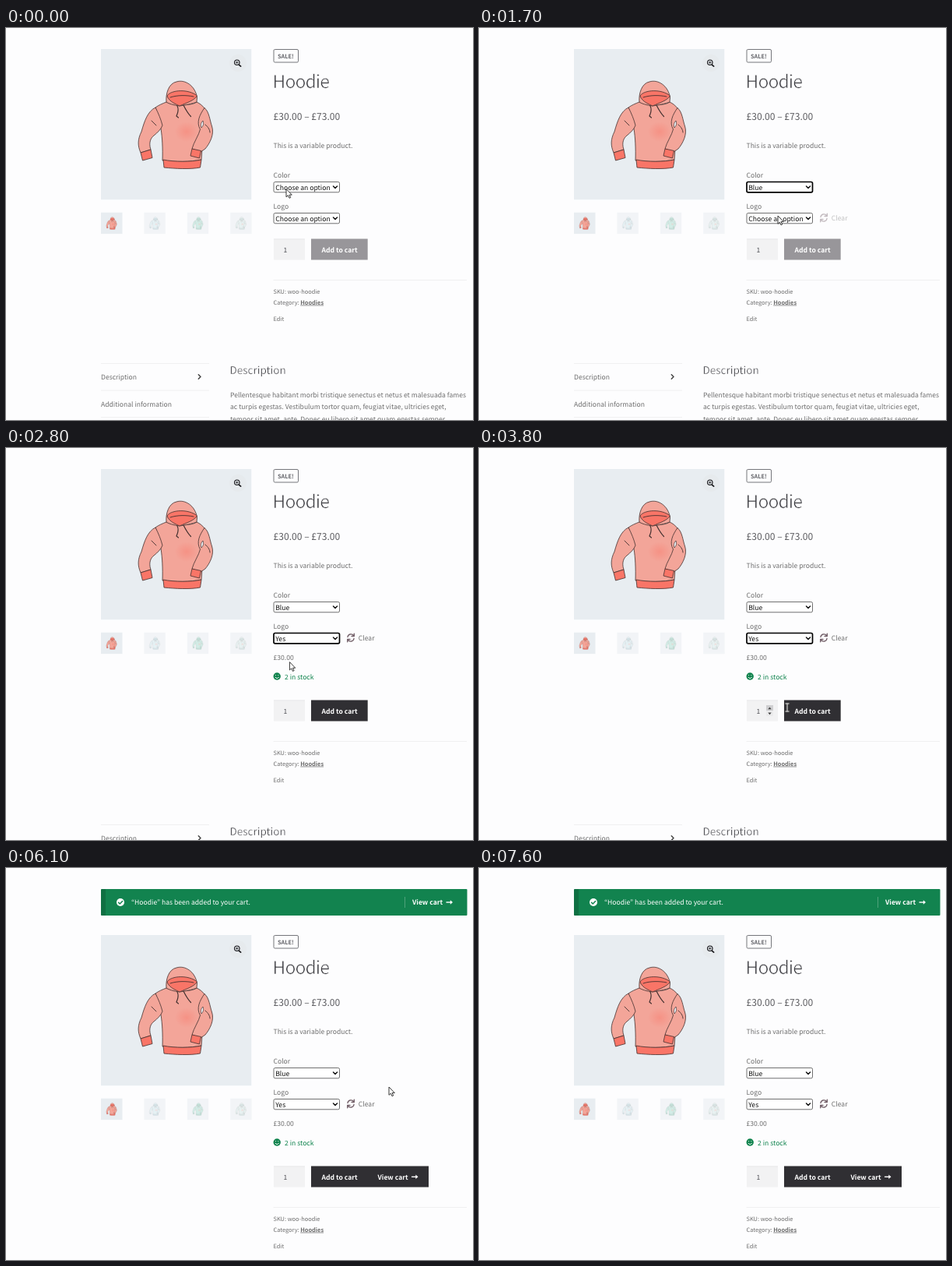
Write an HTML page that moves like this. It is 600 px wide and 503 px high and loops after 8.1 s.

```html
<!DOCTYPE html>
<html lang="en">
<head>
<meta charset="utf-8">
<title>Hoodie</title>
<style>
  html, body { margin: 0; width: 100%; height: 100%; overflow: hidden; background: #fdfdfe; }
  svg { display: block; }
  text {
    font: 8.58px "Noto Sans CJK KR", "Noto Sans CJK JP", "Noto Sans CJK SC", "Open Sans", sans-serif;
    fill: #6d6d6d; text-rendering: geometricPrecision;
  }
  .bold { font-weight: 600; }
  .small { font-size: 7.42px; }
  .white { fill: #fff; }
  .ink { fill: #111; }
  .light { font-weight: 300; fill: #3a3a3f; }
  .title { font-size: 23px; letter-spacing: -.04em; }
  .thinned .light { stroke: #fdfdfe; stroke-width: .028em; }
  .rule { stroke: #f0f0f1; }
  .line { fill: none; stroke-linecap: round; stroke-linejoin: round; }
  .cloth { fill: var(--cloth); stroke: #43302f; stroke-width: .8; stroke-linejoin: round; }
  .trim { fill: var(--trim); }
  .coral { --cloth: #f3a599; --trim: #f97567; }
  .blue { --cloth: #cfe6ec; --trim: #b4d6e0; }
  .green { --cloth: #a9dccf; --trim: #8cccbb; }
  .pale { --cloth: #d3e6e5; --trim: #bcd9d8; }
</style>
</head>
<body>
<svg id="stage" width="600" height="503" viewBox="0 0 600 503">
  <defs>
    <radialGradient id="blush">
      <stop offset="0" stop-color="#f97567" stop-opacity=".4"/>
      <stop offset="1" stop-color="#f97567" stop-opacity="0"/>
    </radialGradient>
    <clipPath id="frame"><rect width="193.5" height="193.5"/></clipPath>
    <clipPath id="reveal"><rect id="revealBox" x="340" y="260" width="260" height="0"/></clipPath>

    <g id="hoodie">
      <rect width="193.5" height="193.5" fill="#e8edf1"/>
      <path class="cloth" d="M84 68C79 70 74 72 70 75C76 92 80 110 79 143C95 145 115 145 129 142C131 120 131 100 133 76C130 72 127 70 123 68C117 73 93 73 84 68Z"/>
      <ellipse cx="110" cy="106" rx="15" ry="13" fill="url(#blush)"/>
      <path class="cloth trim" d="M80 142C95 145 115 145 129 142L127.500 152C115 154.500 95 153.500 81 152Z"/>
      <path class="cloth" d="M70 75C60 80 56 92 52 106C47 116 47 124 51 133L64 129C61 120 64 114 68 111C73 107 77 103 79 98C77 90 74 83 70 75Z"/>
      <path class="cloth trim" d="M51 133L64 129L66 139.500L53.500 143Z"/>
      <path class="cloth" d="M133 75.500C139 80 140 92 142.500 99C146 109 140 121 134 128L128 132L117 128C119 120 126 110 127.500 103C122 94 127 84 133 75.500Z"/>
      <path class="cloth trim" d="M117 128L128.500 130.500L126.500 140L115 137Z"/>
      <path fill="#e8edf1" stroke="#43302f" stroke-width=".7" d="M129 101C132 98 132 95 131 92C128 95 128 98 129 101Z"/>
      <path class="cloth" d="M84 68C83 57 87 44 97 42C108 38.500 121 47 123.500 62L123 68C118 70 108 72 101 73C93 72 87 70 84 68Z"/>
      <path class="cloth trim" d="M85 60C90 52 113 51 123.500 60C120 66 110 69 101 73C92 69 87 66 85 60Z"/>
      <path class="line" stroke="#43302f" stroke-width="1.200" d="M98 73C101 79 98 83 97 86L99.500 88M106 72C109 78 112 83 115.500 86.500"/>
      <path class="line" stroke="#43302f" stroke-width=".9" d="M89 62C98 59 110 59 119 61M65 92L71 98M134 97C138 100 140 104 140 107"/>
    </g>
    <g id="arrow">
      <path d="M0 0H6.500" stroke="#fff" stroke-width="1.400"/>
      <path d="M5.300 -2.700L8.500 0L5.300 2.700Z" fill="#fff"/>
    </g>
  </defs>

  <g id="notice">
    <rect x="122" y="27" width="470.500" height="34" rx="1" fill="#12834f"/>
    <rect x="122" y="27" width="6" height="34" fill="#000" opacity=".15"/>
    <circle cx="147" cy="44" r="5" fill="#fff"/>
    <path class="line" d="M144.500 44.200L146.300 46L149.600 42.500" stroke="#12834f" stroke-width="1.500"/>
    <text class="white" x="161" y="47.300">“Hoodie” has been added to your cart.</text>
    <path d="M512.500 37V51" stroke="#fff" opacity=".25"/>
    <text class="white bold" x="522" y="47.300">View cart</text>
    <use href="#arrow" x="565.500" y="44"/>
  </g>

  <g id="page">
    <g transform="translate(122 27)" clip-path="url(#frame)">
      <use href="#hoodie" class="coral"/>
      <use href="#hoodie" class="coral" id="zoom"/>
      <circle cx="176" cy="18" r="11" fill="#e6eaed"/>
      <path class="line" d="M177.500 20.300L179.600 22.200" stroke="#1b1b1f" stroke-width="1.700"/>
      <circle cx="174.800" cy="17.200" r="3.200" fill="none" stroke="#1b1b1f" stroke-width="1.200"/>
      <path d="M173.200 17.200H176.400M174.800 15.600V18.800" stroke="#1b1b1f" stroke-width=".9"/>
    </g>
    <g id="thumbs"></g>

    <rect x="344" y="27.500" width="31.500" height="16.500" rx="1.500" fill="none" stroke="#66676c" stroke-width=".9"/>
    <text class="bold" x="349" y="38.700" style="font-size:7.300px;fill:#66676c">SALE!</text>
    <text class="light title" x="342.600" y="77">Hoodie</text>
    <text x="343.500" y="118" style="font-size:12.100px;fill:#5c5c60">£30.00 – £73.00</text>
    <text x="343.500" y="154">This is a variable product.</text>
    <text x="343.500" y="192">Color</text>
    <text x="343.500" y="232">Logo</text>
    <g id="selects"></g>

    <g id="clear">
      <path class="line" d="M439 242.500C439.500 238.600 444.500 237.600 446.700 240.800M447.300 238.200V241.500H444M447 244.500C446.500 248.400 441.500 249.300 439.300 246.200M438.700 248.800V245.500H442" stroke="#74616a" stroke-width="1.400"/>
      <text x="452.800" y="247">Clear</text>
    </g>

    <g clip-path="url(#reveal)">
      <text x="343.500" y="272">£30.00</text>
      <circle cx="348.200" cy="293" r="4.700" fill="#0f834d"/>
      <path class="line" d="M346 294.500Q348.200 297 350.400 294.500M346.600 291.500V291.700M349.800 291.500V291.700" stroke="#fff" stroke-width="1"/>
      <text x="358" y="296.500" style="fill:#0f834d">2 in stock</text>
    </g>

    <g id="lower">
      <rect x="344" y="270.500" width="40" height="27" fill="#f2f2f3"/>
      <path d="M344 271H384" stroke="#e9e9ea"/>
      <text x="356.500" y="287.700" style="fill:#4c4d52">1</text>
      <g id="spinner">
        <rect x="369" y="277" width="9" height="7" fill="#cfcfd1"/>
        <rect x="369" y="284" width="9" height="7" fill="#ebebec"/>
        <path d="M371.300 282.300L373.500 279.500L375.700 282.300ZM371.300 286.500L373.500 289.300L375.700 286.500Z" fill="#444"/>
      </g>
      <rect id="button" x="392" y="270.500" height="27"/>
      <text class="white bold" x="405.500" y="287.700">Add to cart</text>
      <g id="viewCart">
        <text class="white bold" x="477.500" y="287.700">View cart</text>
        <use href="#arrow" x="521" y="284.300"/>
      </g>

      <path class="rule" d="M343.500 323.500H592M122 430.500H261M122 465H261M122 499.500H261"/>
      <text class="small" x="343.500" y="341.300">SKU: woo-hoodie</text>
      <text class="small" x="343.500" y="354.600">Category: <tspan class="bold" text-decoration="underline">Hoodies</tspan></text>
      <text class="small" x="343.500" y="376">Edit</text>
      <text x="122" y="451">Description</text>
      <path class="line" d="M247.300 444.800L250 447.500L247.300 450.200" stroke="#444" stroke-width="1.500"/>
      <text x="122" y="486">Additional information</text>
      <text class="light" x="287.500" y="444" style="font-size:13.500px">Description</text>
      <text x="288" y="474">Pellentesque habitant morbi tristique senectus et netus et malesuada fames</text>
      <text x="288" y="489.300">ac turpis egestas. Vestibulum tortor quam, feugiat vitae, ultricies eget,</text>
      <text x="288" y="504.500">tempor sit amet, ante. Donec eu libero sit amet quam egestas semper.</text>
    </g>
  </g>

  <g id="cursor">
    <path id="pointer" d="M0 0V10.300L2.400 8.200L4 11.800L5.700 11L4.100 7.600H7.300Z" fill="#fff" stroke="#222" stroke-width=".9" stroke-linejoin="round"/>
    <g id="ibeam" class="line">
      <path d="M-2 -5H2M0 -5V5M-2 5H2" stroke="#444" stroke-width="2.600"/>
      <path d="M-2 -5H2M0 -5V5M-2 5H2" stroke="#ddd" stroke-width="1"/>
    </g>
    <path id="hand" d="M-1 0Q0 -1.200 1 0V4L6 5.200Q7 5.600 6.800 7L6 11H0L-3.500 6.500Q-3 5.200 -1 7Z" fill="#fff" stroke="#222" stroke-width=".9" stroke-linejoin="round"/>
  </g>
</svg>

<script>
const $ = id => document.getElementById(id);
const LOOP = 8100, STEP = 100;
const OPEN_GAP = 53, NOTICE_GAP = 59;
const IMAGE = { x: 122, y: 27, size: 193.5, zoom: 2.48 };
const AT = { color: 1500, logoClick: 2000, logo: 2600, buy: 4600, added: 5900, gone: 7400 };

// time, x, y of the cursor tip
const PATH = [
  [0, 360, 206.5], [300, 360, 206.5], [800, 358, 222], [1400, 358, 222],
  [1700, 384, 241], [2000, 384, 241], [2500, 363, 272], [2700, 363, 272],
  [3500, 396, 333], [3900, 396, 333], [4300, 425, 336], [4700, 425, 336],
  [5300, 492, 281], [6100, 492, 281], [6700, 309, 243], [7300, 75, 200]
];

const clamp = v => Math.min(1, Math.max(0, v));
const smooth = v => v * v * (3 - 2 * v);
const ramp = (t, start, length) => clamp((t - start) / length);
const between = (t, a, b) => t >= a && t < b;
const show = (id, on) => $(id).style.display = on ? '' : 'none';
const move = (id, x, y) => $(id).setAttribute('transform', `translate(${x} ${y})`);

function cursorAt(t) {
  const i = PATH.findIndex(key => key[0] > t);
  if (i < 0) return PATH[PATH.length - 1].slice(1);
  const [t0, x0, y0] = PATH[i - 1], [t1, x1, y1] = PATH[i];
  const k = smooth((t - t0) / (t1 - t0));
  return [x0 + (x1 - x0) * k, y0 + (y1 - y0) * k];
}

$('thumbs').innerHTML = ['coral', 'blue', 'green', 'pale'].map((tint, i) =>
  `<use href="#hoodie" class="${tint}" opacity="${i ? .5 : 1}"
    transform="translate(${122 + i * 55.4} 236.700) scale(.142)"/>`).join('');

$('selects').innerHTML = ['color', 'logo'].map((name, i) =>
  `<g transform="translate(344 ${197.5 + i * 40})">
    <rect id="${name}Box" width="84.500" height="13.300" rx="1.800" fill="#fff"/>
    <text id="${name}Text" class="ink" x="2.200" y="10.300" style="font-size:8.650px"></text>
    <path class="line" d="M76.500 5.500L79 8L81.500 5.500" stroke="#111" stroke-width="1.500"/>
  </g>`).join('');

function setSelect(name, value, focused) {
  $(name + 'Text').textContent = value || 'Choose an option';
  $(name + 'Box').setAttribute('stroke', focused ? '#000' : '#707070');
  $(name + 'Box').setAttribute('stroke-width', focused ? 1.7 : 1);
}

function zoomImage(x, y, shift) {
  const { size, zoom } = IMAGE;
  const u = (x - IMAGE.x) / size, v = (y - IMAGE.y - shift) / size;
  const inside = u > 0 && u < 1 && v > 0 && v < 1;
  show('zoom', inside);
  if (!inside) return;
  const spare = size * (zoom - 1);
  $('zoom').setAttribute('transform', `translate(${-u * spare} ${-v * spare}) scale(${zoom})`);
}

function render(t) {
  const added = t >= AT.added;
  const shift = added ? NOTICE_GAP : 0;
  const drop = OPEN_GAP * smooth(ramp(t, AT.logo, 200));
  const [x, y] = cursorAt(t);

  show('notice', added);
  move('page', 0, shift);
  move('lower', 0, drop);
  $('revealBox').setAttribute('height', drop);

  setSelect('color', t >= AT.color && 'Blue', between(t, AT.color, AT.logoClick));
  setSelect('logo', t >= AT.logo && 'Yes', between(t, AT.logo, AT.buy));
  $('clear').style.opacity = smooth(ramp(t, AT.color, 450));

  const ready = between(t, AT.logo, AT.buy) || added;
  $('button').setAttribute('fill', ready ? '#302f33' : '#98969a');
  $('button').setAttribute('width', added ? 151 : 72.7);
  show('viewCart', added);

  const typing = between(t, 3300, 4000), pressing = between(t, 4000, 4800);
  show('spinner', typing);
  show('cursor', t < AT.gone);
  show('ibeam', typing);
  show('hand', pressing);
  show('pointer', !typing && !pressing);
  move('cursor', x, y);
  zoomImage(x, y, shift);
}

// Thin the headings by a hairline when no light weight is installed.
const pen = document.createElement('canvas').getContext('2d');
const widthAt = weight => {
  pen.font = `${weight} 100px "Noto Sans CJK KR", sans-serif`;
  return pen.measureText('Hoodie').width;
};
if (widthAt(300) === widthAt(400)) $('stage').classList.add('thinned');

const start = performance.now();
function tick() {
  const t = (performance.now() - start) % LOOP;
  render(Math.floor(t / STEP) * STEP);
  requestAnimationFrame(tick);
}
render(0);
requestAnimationFrame(tick);
</script>
</body>
</html>
```
